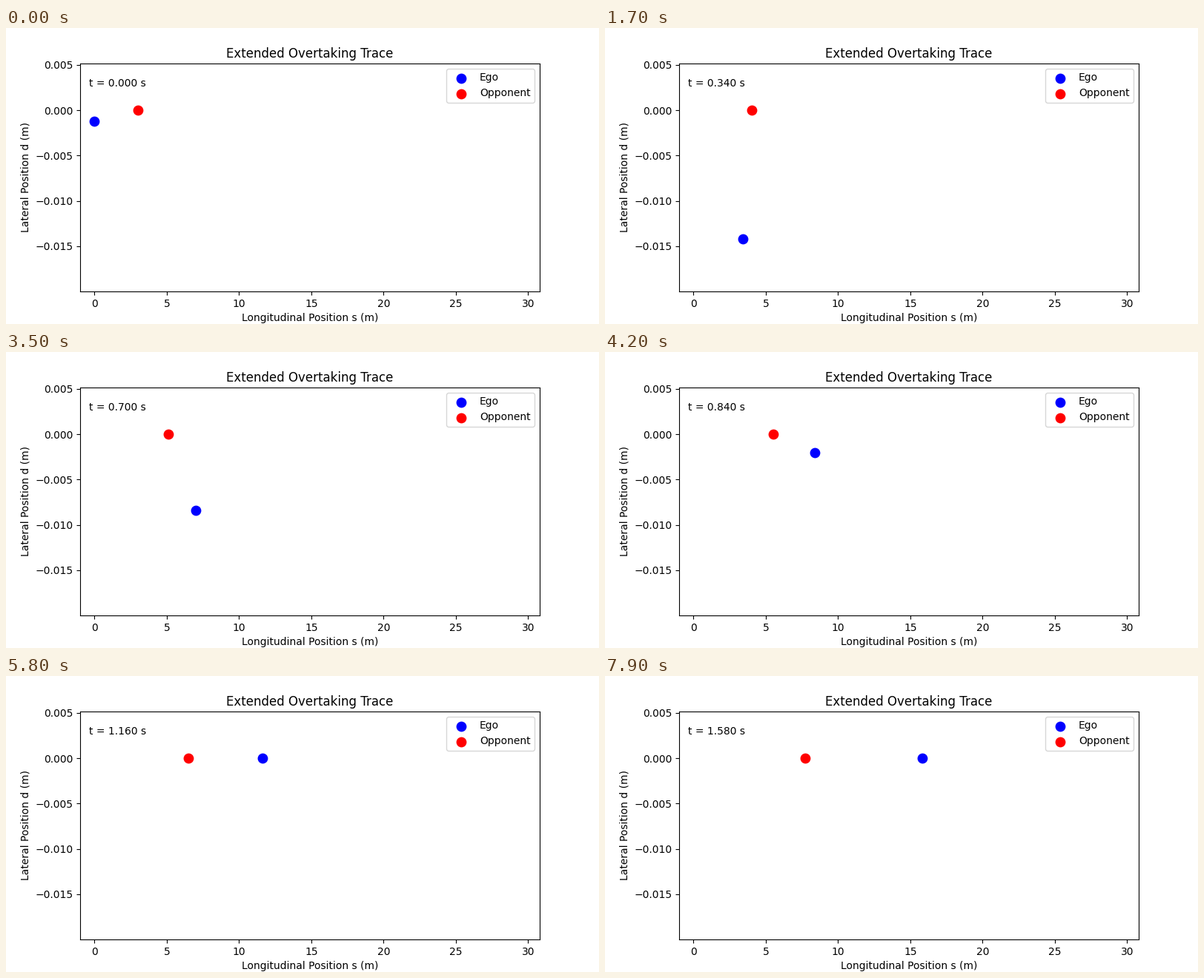
Recreate the animation shown at these times as a matplotlib script. Size 800 by 400 pixels, loop 8000 ms.

```python
import numpy as np
import matplotlib.pyplot as plt
from matplotlib.animation import FuncAnimation

FRAMES, INTERVAL, DT = 80, 100, 0.02
EGO_SPEED, OPP_SPEED, OPP_START = 10.0, 3.0, 3.0
DEPTH, OVERSHOOT, MARGIN = 0.01498, 0.00014, 0.005


def lateral(t):
    """Ego's swerve: a smooth dip, then a slight overshoot as it settles."""
    u = (t - 0.431) / 0.479
    dip = max(0.0, 1 - u * u) ** 1.53
    settle = np.exp(-((t - 0.93) / 0.06) ** 2)
    return OVERSHOOT * settle - DEPTH * dip


fig, ax = plt.subplots(figsize=(8, 4), dpi=100)
ax.set_xlim(-1, 30.8)
ax.set_ylim(-DEPTH - MARGIN, OVERSHOOT + MARGIN)
ax.set_xlabel("Longitudinal Position s (m)")
ax.set_ylabel("Lateral Position d (m)")
ax.set_title("Extended Overtaking Trace")

ego = ax.scatter([0], [0], s=80, color="blue", label="Ego")
opponent = ax.scatter([OPP_START], [0], s=80, color="red", label="Opponent")
clock = ax.text(0.02, 0.9, "", transform=ax.transAxes)
ax.legend(loc="upper right")


def update(i):
    t = i * DT
    ego.set_offsets([[EGO_SPEED * t, lateral(t)]])
    opponent.set_offsets([[OPP_START + OPP_SPEED * t, 0]])
    clock.set_text(f"t = {t:.3f} s")
    return ego, opponent, clock


anim = FuncAnimation(fig, update, frames=FRAMES, interval=INTERVAL,
                     repeat=True, repeat_delay=0)
plt.show()
```
